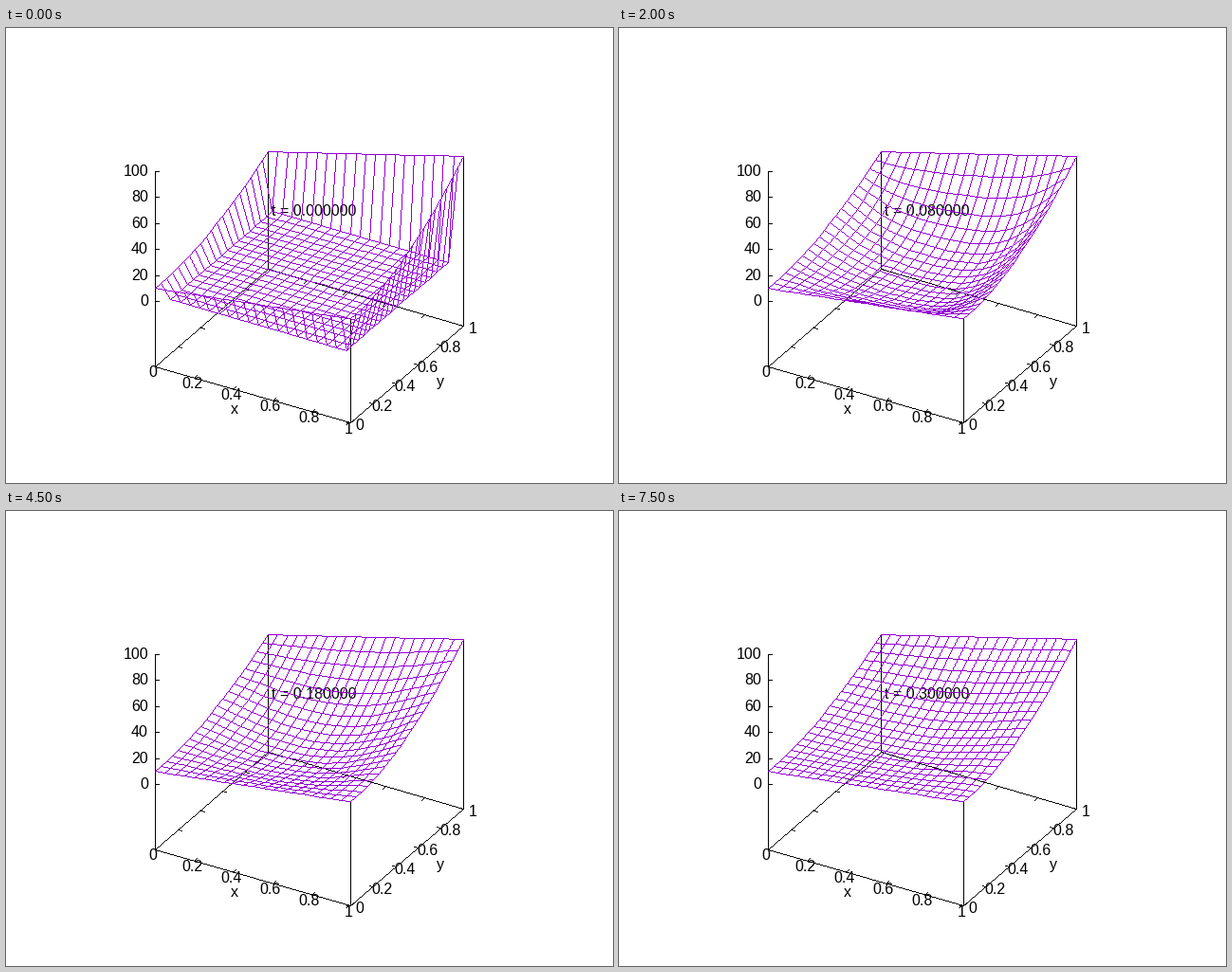
Recreate the animation shown at these times as a matplotlib script. Size 640 by 480 pixels, loop 8 s.

```python
import numpy as np
import matplotlib.pyplot as plt
from matplotlib.animation import FuncAnimation

W, H, DPI = 640, 480, 100
FRAMES, INTERVAL = 16, 500
N = 20                       # cells per side
DT, DIFFUSIVITY = 0.02, 0.25
BLACK, VIOLET = (0, 0, 0), (148, 0, 211)
BASE = -50                   # height of the floor


def project(x, y, z):
    """Data coordinates to stage pixels."""
    return (157 + 206 * x + 119 * y,
            288.05 + 59.7 * x - 102.8 * y - 1.375 * z)


def draw_line(img, p, q, color):
    """One-pixel line without antialiasing."""
    x0, y0, x1, y1 = (int(round(v)) for v in (*p, *q))
    n = max(abs(x1 - x0), abs(y1 - y0)) + 1
    xs = np.rint(np.linspace(x0, x1, n)).astype(int)
    ys = np.rint(np.linspace(y0, y1, n)).astype(int)
    img[ys, xs] = (*color, 255)


def blank():
    return np.zeros((H, W, 4), np.uint8)


# Heat equation on the unit square with fixed edges, implicit steps
grid = np.linspace(0, 1, N + 1)
X, Y = np.meshgrid(grid, grid, indexing="ij")
edges = 10 + 20 * X + 30 * Y**2 + 20 * X * Y**2
edges[1:-1, 1:-1] = 0


def solve():
    m = N - 1
    lam = DIFFUSIVITY * DT * N * N
    second = 2 * np.eye(m) - np.eye(m, k=1) - np.eye(m, k=-1)
    eye = np.eye(m)
    step = np.linalg.inv(np.eye(m * m)
                         + lam * (np.kron(second, eye) + np.kron(eye, second)))
    inflow = lam * (edges[:-2, 1:-1] + edges[2:, 1:-1]
                    + edges[1:-1, :-2] + edges[1:-1, 2:])
    u = edges.copy()
    states = [u]
    for _ in range(FRAMES - 1):
        u = u.copy()
        u[1:-1, 1:-1] = (step @ (u[1:-1, 1:-1] + inflow).ravel()).reshape(m, m)
        states.append(u)
    return states


def mesh_image(u):
    img = blank()
    px, py = project(X, Y, u)
    pts = np.stack([px, py], axis=-1)
    for i in range(N + 1):
        for j in range(N):
            draw_line(img, pts[i, j], pts[i, j + 1], VIOLET)
            draw_line(img, pts[j, i], pts[j + 1, i], VIOLET)
    return img


def box_image():
    img = blank()

    def line(a, b):
        draw_line(img, project(*a), project(*b), BLACK)

    def tick(x, y, z, dx, dy):
        px, py = project(x, y, z)
        draw_line(img, (px, py), (px + dx, py + dy), BLACK)

    corners = [(0, 0), (1, 0), (1, 1), (0, 1)]
    for a, b in zip(corners, corners[1:] + corners[:1]):
        line((*a, BASE), (*b, BASE))
    for (x, y), top in zip(corners, (100, 30, 80, 40)):
        line((x, y, BASE), (x, y, top))
    for v in np.linspace(0, 1, 6):
        tick(v, 0, BASE, 3, -3)
        tick(v, 1, BASE, -3, 3)
        tick(0, v, BASE, 4, 1)
        tick(1, v, BASE, -4, -1)
        tick(0, 0, 100 * v, 4, 0)
    return img


plt.rcParams["font.family"] = "Liberation Sans"
fig = plt.figure(figsize=(W / DPI, H / DPI), dpi=DPI, facecolor="white")
ax = fig.add_axes([0, 0, 1, 1])
ax.axis("off")


def show(img, z):
    return ax.imshow(img, extent=(0, W, H, 0), interpolation="nearest",
                     aspect="auto", zorder=z)


def label(x, y, s, ha="center"):
    return ax.text(x, y, s, ha=ha, va="baseline", color="black",
                   fontsize=16 * 72 / DPI, zorder=2)


show(box_image(), 1)
meshes = [mesh_image(u) for u in solve()]
mesh = show(meshes[0], 3)
ax.set_xlim(0, W)
ax.set_ylim(H, 0)

for v in np.linspace(0, 1, 6):
    name = f"{v:.1g}"
    px, py = project(v, 0, BASE)
    label(px - 2, py + 11, name)
    px, py = project(1, v, BASE)
    label(px + 10, py + 8, name)
    px, py = project(0, 0, 100 * v)
    label(150, py + 5, f"{100 * v:.0f}", "right")
label(241, 407, "x")
label(457.5, 378, "y")
clock = label(280, 198, "", "left")


def update(k):
    mesh.set_data(meshes[k])
    clock.set_text(f"t = {k * DT:.6f}")
    return mesh, clock


anim = FuncAnimation(fig, update, frames=FRAMES, interval=INTERVAL,
                     repeat=True, repeat_delay=0, blit=False)
plt.show()
```
